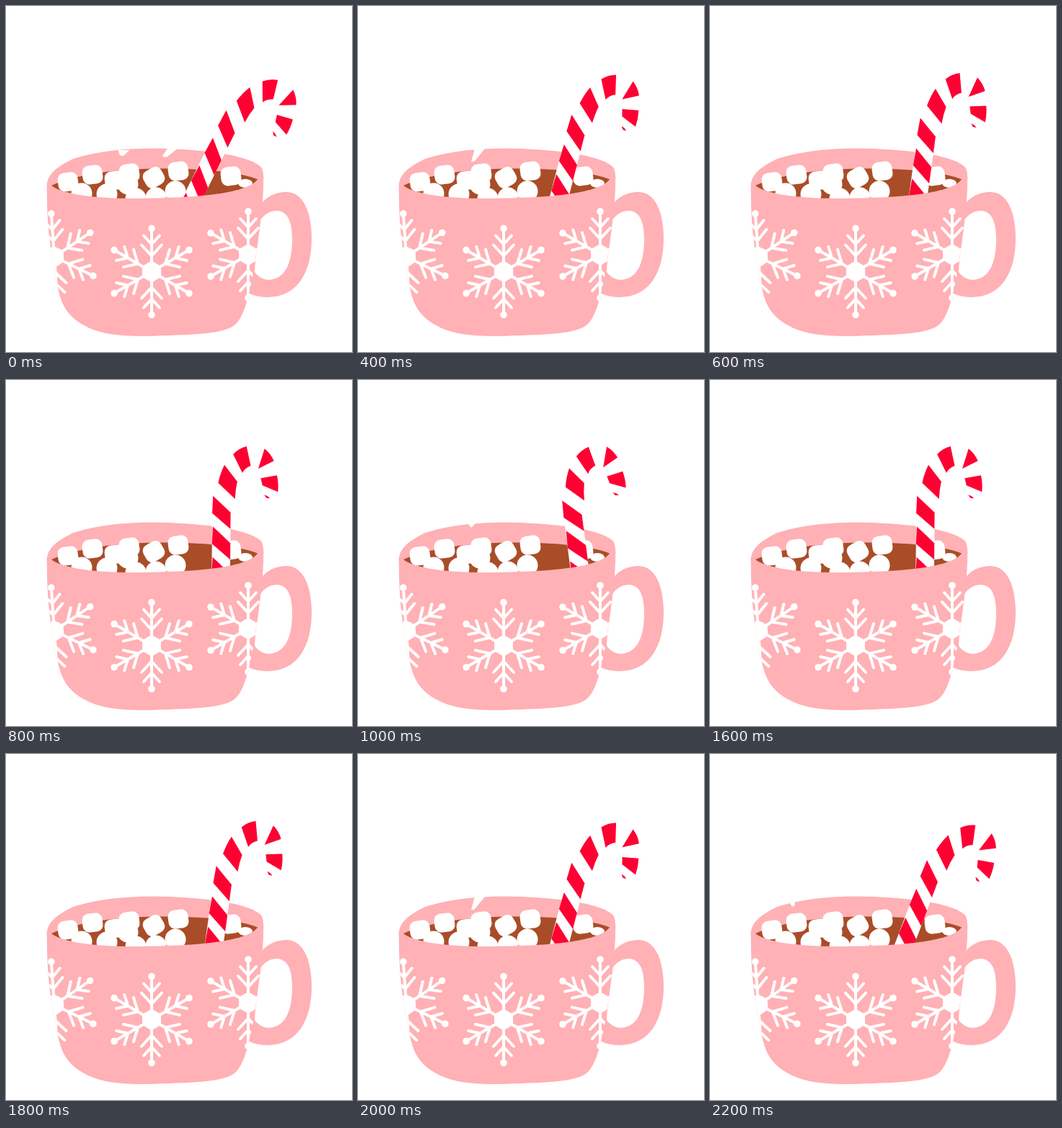
An HTML page that plays this animation: 480 by 480 pixels, repeating every 2.4 s.

```html
<!DOCTYPE html>
<html lang="en">
<head>
<meta charset="utf-8">
<title>Hot cocoa</title>
<style>
html, body { margin: 0; width: 100%; height: 100%; overflow: hidden; background: #fff; }
svg { display: block; width: 100vw; height: 100vh; }
.pink { fill: #ffb1b5; }
.white { fill: #fff; }
.red { fill: #ff0033; }
</style>
</head>
<body>
<svg viewBox="0 0 480 480">
  <defs>
    <path id="front" d="M57 243 Q59 251 63 250 C84 262 125 267 177 267 C245 266 329 264 349 241 L357 236
      C358 270 352 310 345 358 C339 395 332 428 319 441 C304 456 255 456 194 458 C145 458 120 453 96 435
      C76 418 73 400 67 365 C59 327 56 284 57 243 Z"/>
    <clipPath id="inside"><use href="#front"/></clipPath>
    <g id="arm" fill="none" stroke="#fff" stroke-width="4" stroke-linecap="round">
      <path d="M0 0 V-60 M-14 -37 L0 -22 L14 -37 M-11 -50 L0 -38 L11 -50"/>
      <circle cy="-60" r="4.8" fill="#fff" stroke="none"/>
    </g>
    <rect id="mallow" x="-14" y="-13" width="28" height="26" rx="9"/>
  </defs>

  <path class="pink" d="M57 256 C55 239 61 228 93 212 C130 200 175 197 211 197.500 C270 199 340 206 355 225
    Q359 235 356 252 Z"/>
  <g class="white">
    <path class="puff" data-pose="0" d="M156 200 H171 L164 207 Q159 210 157 205 Z M217 208 L225 196 H240 L224 209 Q219 211 217 208 Z"/>
    <path class="puff" data-pose="1" d="M111 204 H118 L117 211 Q114 213 112 209 Z"/>
    <path class="puff" data-pose="2" d="M157 216 L162 198 H176 L161 216 Z"/>
    <path class="puff" data-pose="5" d="M152 198 H163 Q159 205 156 204 Z"/>
  </g>

  <path fill="#a94d28" d="M63 249 C100 233 155 226 210 225.500 C270 225 325 230 349 240.500 C335 264 260 270 177 270
    C120 270 80 262 63 249 Z"/>
  <g id="mallows" class="white"></g>

  <g id="cane">
    <path d="M298.500 320 L299 160" stroke="#fff" stroke-width="25.500"/>
    <g id="stem" class="red"></g>
    <g class="red">
      <path d="M302.500 118 L320.500 141 Q318 152 317.500 165 L294 143 Q297 129 302.500 118 Z"/>
      <path d="M314.500 103 Q322 95 333 92 L339 119 Q331 122 327.500 129 Z"/>
      <path d="M358 95 Q367 102 371 112 L349.500 123 Z"/>
      <path d="M353 136 L375.500 132 Q378 143 377 155 L355.500 146 Z"/>
      <path d="M358 159 L363 161 L366 164 L361 163.500 Z"/>
    </g>
  </g>

  <use href="#front" class="pink"/>
  <path class="pink" fill-rule="evenodd" d="M345 290 C354 267 371 258 390 258 C414 259 424 289 424 322
    C424 369 405 404 362 404 Q346 404 334 397 L345 340 Z
    M353 297 C359 288 367 284 376 284 C392 285 397 301 397 323 C397 356 388 379 364 380
    Q352 379 345 369 C346 345 351 318 353 297 Z"/>
  <g id="flakes" clip-path="url(#inside)"></g>
</svg>
<script>
const $ = id => document.getElementById(id);
const range = n => [...Array(n).keys()];

const backRow = [[86, 244], [120, 234], [151, 242], [171, 232], [205, 238], [239, 229], [312, 236]];
const frontRow = [[105, 260], [140, 261], [169, 247], [180, 267], [208, 266], [235, 257]];
$('mallows').innerHTML =
  backRow.map(([x, y], i) => `<use href="#mallow" transform="translate(${x} ${y}) rotate(${i === 4 ? -30 : -8})"/>`).join('') +
  frontRow.map(([x, y]) => `<circle cx="${x}" cy="${y}" r="14.500"/>`).join('') +
  '<ellipse cx="332" cy="246" rx="10" ry="6"/>';

// Slanted stripes at an even pitch down the stem
$('stem').innerHTML = range(4).map(i =>
  `<path transform="translate(0 ${161 + 42.5 * i})" d="M287 0 L311.500 23 V46 L286 24 Z"/>`).join('');

function flake(x, y, tilt) {
  const arms = range(6).map(i => `<use href="#arm" transform="rotate(${60 * i})"/>`).join('');
  return `<g transform="translate(${x} ${y}) rotate(${tilt})">${arms}
    <path class="white" d="M0 -15 L13 -7.500 V7.500 L0 15 L-13 7.500 V-7.500 Z"/></g>`;
}
$('flakes').innerHTML = flake(202, 368.5, 0) + flake(67, 348, -4) + flake(336, 345, 0);

// Twelve held poses per loop: 0 to 6 and back, the swing gathering speed
const puffs = document.querySelectorAll('.puff');
function draw() {
  const step = Math.floor(performance.now() / 200) % 12;
  const pose = Math.min(step, 12 - step);
  const angle = 26 - 5.2 * pose - 0.3 * pose * pose;
  $('cane').setAttribute('transform', `rotate(${angle} 332 193)`);
  for (const puff of puffs) puff.style.opacity = +(+puff.dataset.pose === pose);
  requestAnimationFrame(draw);
}
draw();
</script>
</body>
</html>
```
